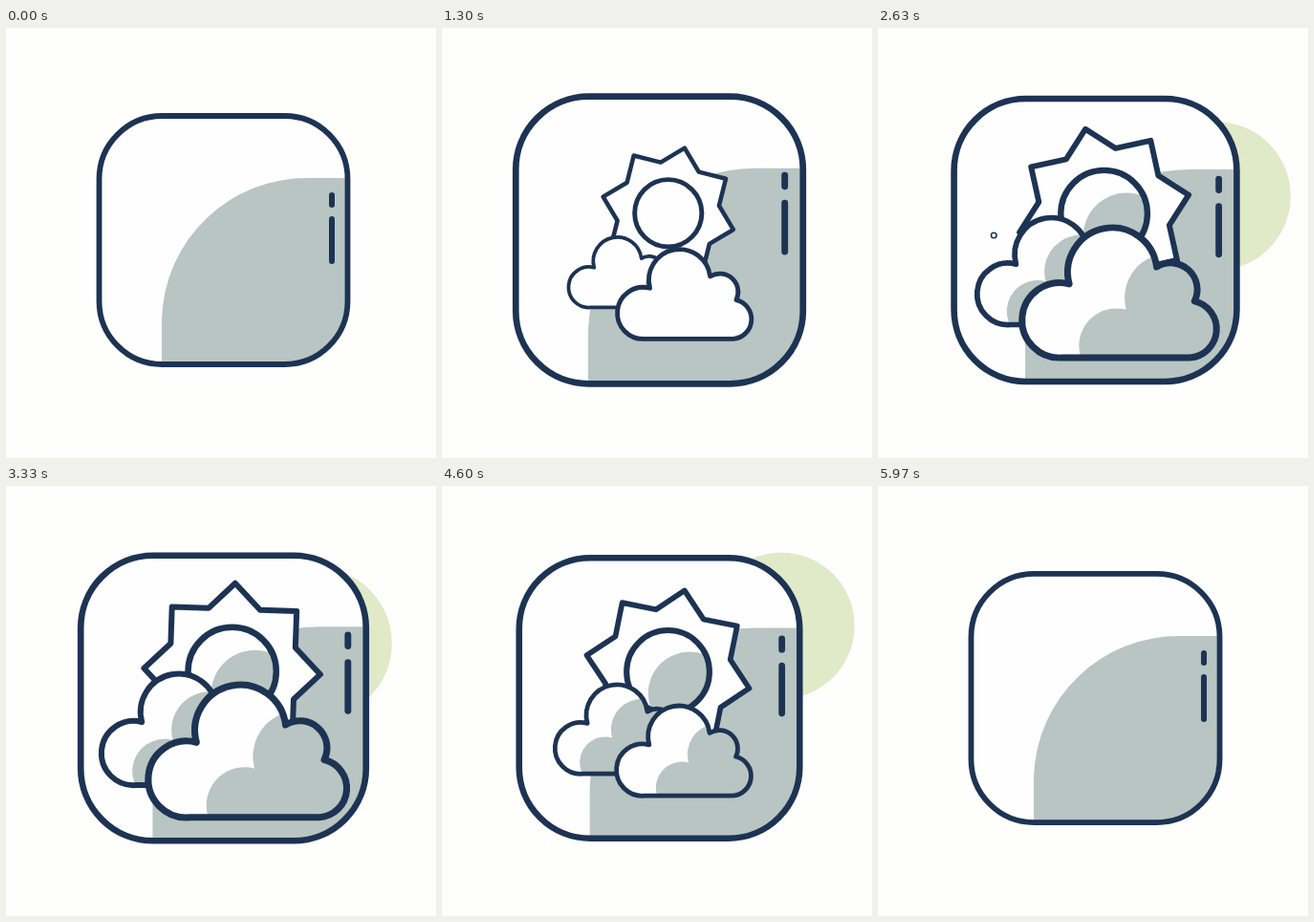
An HTML page with a canvas that plays this animation: 450 by 450 pixels, repeating every 6000 ms.

```html
<!DOCTYPE html>
<html lang="en">
<head>
<meta charset="utf-8">
<title>Weather icon</title>
<style>
html, body { margin: 0; width: 100%; height: 100%; overflow: hidden; background: #fefefc; }
canvas { display: block; width: 450px; height: 450px; }
</style>
</head>
<body>
<canvas id="stage"></canvas>
<script>
const LOOP = 6000;
const PAPER = '#fefefc', WHITE = '#fefefe', NAVY = '#1d3353', SHADE = '#b8c5c2', LIME = '#e0e9c8';
const canvas = document.getElementById('stage');
const ratio = window.devicePixelRatio || 1;
canvas.width = canvas.height = 450 * ratio;
const ctx = canvas.getContext('2d');

// Decelerating rise from 0 to 1 between two times; swapped times make a fall
function rise(t, from, to) {
  const u = Math.min(1, Math.max(0, (t - from) / (to - from)));
  return u * (2 - u);
}
const life = (t, start, full, fade, end) => rise(t, start, full) * rise(t, end, fade);

const cloudPath = new Path2D('M-62 66.5A39.5 39.5 0 1 1-55-11A47 47 0 1 1 37-29' +
  'A28 28 0 0 1 77 7A30.2 30.2 0 0 1 72 66.5Z');
const hillPath = new Path2D('M-64.5 140V83A152 152 0 0 1 89.5-65H140V140Z');

const framePath = new Path2D();
framePath.roundRect(-130, -130, 260, 260, 66);

const discPath = new Path2D();
discPath.arc(0, 0, 1, 0, 7);

const starPath = new Path2D();
for (let i = 0; i < 16; i++) {
  const a = i * Math.PI / 8 - Math.PI / 2, r = i % 2 ? 1.53 : 2;
  starPath.lineTo(r * Math.cos(a), r * Math.sin(a));
}
starPath.closePath();

function at(x, y, k, draw) {
  if (k < .001) return;
  ctx.save();
  ctx.translate(x, y);
  ctx.scale(k, k);
  draw();
  ctx.restore();
}

function outline(path, width) {
  ctx.lineWidth = width;
  ctx.stroke(path);
}

function paint(path, fill, width) {
  ctx.fillStyle = fill;
  ctx.fill(path);
  if (width) outline(path, width);
}

// A white shape whose shade is a shifted copy of itself
function shaded(path, dx, dy, width) {
  paint(path, WHITE);
  ctx.save();
  ctx.clip(path);
  ctx.translate(dx, dy);
  paint(path, SHADE);
  ctx.restore();
  outline(path, width);
}

function cloud(x, y, width, dx, dy) {
  at(x, y, width / 203, () => shaded(cloudPath, dx, dy, 7));
}

function blob(x, y, r) {
  at(x, y, r, () => paint(discPath, LIME));
}

function ring(t, x, y, start, pulse) {
  const u = (t - start) / 750;
  if (u > 0 && u < 1)
    at(x, y, 6.5 * Math.sin(Math.PI * u) * pulse, () => paint(discPath, WHITE, .57));
}

function dash(y0, y1) {
  ctx.lineWidth = 6;
  ctx.beginPath();
  ctx.moveTo(113.5, y0);
  ctx.lineTo(113.5, y1);
  ctx.stroke();
}

function draw(t) {
  const lift = (1 - Math.cos(Math.PI * t / 1000)) / 2;
  const pulse = 1 + .197 * lift;
  ctx.setTransform(ratio, 0, 0, ratio, 0, 0);
  ctx.fillStyle = PAPER;
  ctx.fillRect(0, 0, 450, 450);
  ctx.translate(227.5, 222);
  ctx.scale(pulse, pulse);
  ctx.strokeStyle = NAVY;
  ctx.lineCap = ctx.lineJoin = 'round';

  const sway = Math.cos(Math.PI * (t - 2250) / 1000);
  blob(104 + 20 * sway, -5 - .0135 * t, 60 * life(t, 1000, 2300, 5100, 5650) * pulse);
  blob(15.5, 96, 52 * life(t, 3200, 4000, 4100, 4900) * pulse);

  paint(framePath, WHITE);
  ctx.save();
  ctx.clip(framePath);
  paint(hillPath, SHADE);
  ctx.restore();

  const slip = -18.5 * lift * lift;
  dash(-47 + slip, -37 + slip);
  dash(-22 + slip, 22 + slip);

  // The shade slides in once the shapes have appeared
  const slide = 1 + 3.5 * rise(t, 1500, 750);
  at(8, -24.4, 35 * life(t, 700, 1900, 4390, 5650) * pulse, () => {
    ctx.save();
    ctx.rotate(.1492 * t * Math.PI / 180);
    paint(starPath, WHITE, .13);
    ctx.restore();
    shaded(discPath, .52 * slide, .52 * slide, .14);
  });

  const back = 131 * life(t, 200, 3050, 4100, 5310);
  cloud(-33.5, 30, back * pulse, 38 * slide, 22 * slide);

  // The front cloud grows in two steps
  const front = (104 * rise(t, 50, 750) + 52 * rise(t, 1750, 2700)) * rise(t, 5100, 4000);
  cloud(24, 50, front * pulse, 60 * slide, 27 * slide);

  ring(t, 93.3, -69, 1300, pulse);
  ring(t, -93.4, -4.4, 2550, pulse);
  ring(t, 93.3, -69, 4800, pulse);
  ring(t, -101.6, -49, 5080, pulse);
  outline(framePath, 5.8);
}

function tick() {
  draw(performance.now() % LOOP);
  requestAnimationFrame(tick);
}
tick();
</script>
</body>
</html>
```
